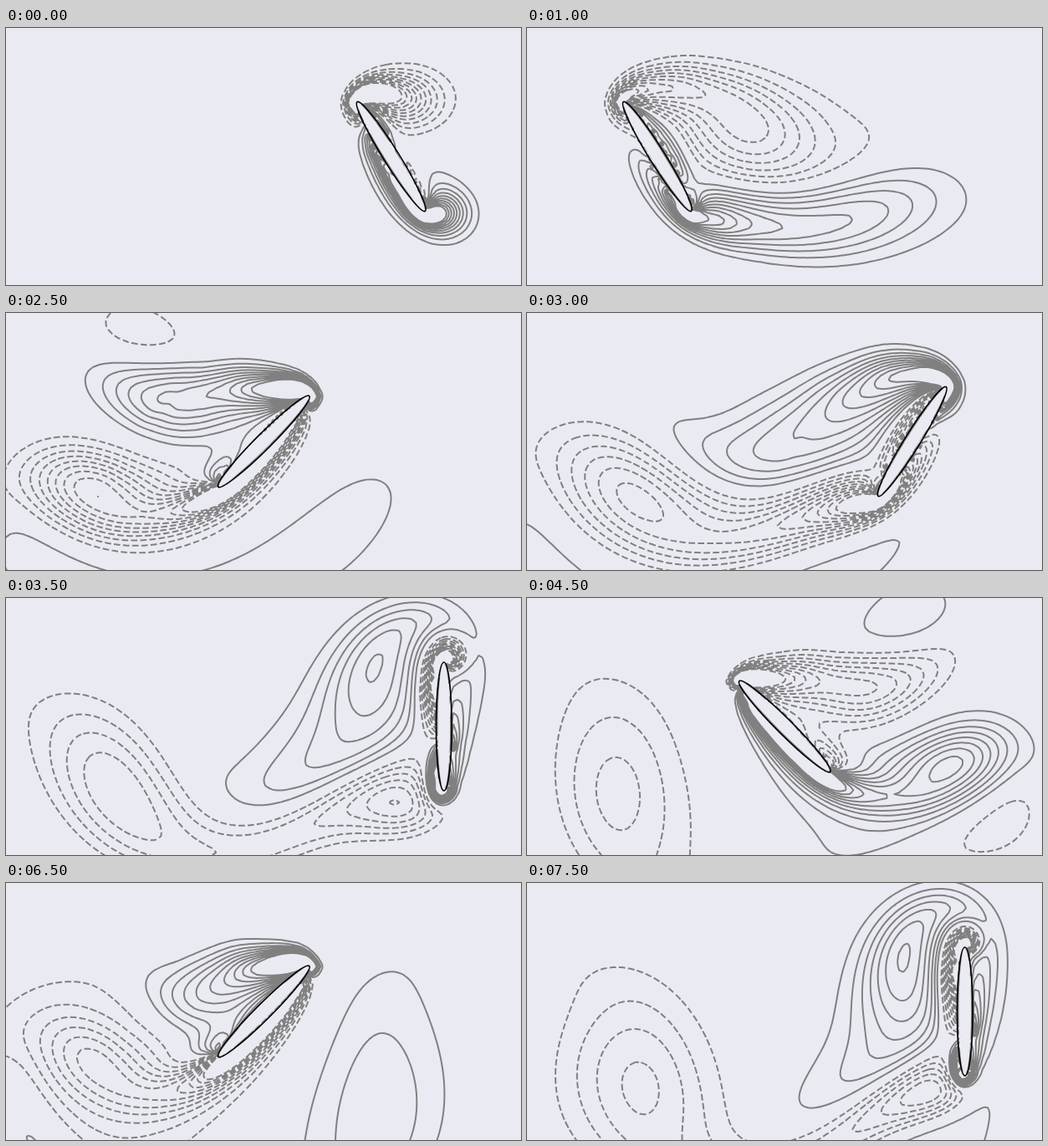
These frames come from a looping animation (616 px wide and 308 px high, 8 s). An HTML page with a canvas:

```html
<!DOCTYPE html>
<html>
<head>
<meta charset="utf-8">
<style>
html, body { margin: 0; width: 100%; height: 100%; overflow: hidden; background: #eaeaf2; }
canvas { display: block; }
</style>
</head>
<body>
<canvas id="stage" width="616" height="308"></canvas>
<script>
// A wing flaps in a viscous fluid that starts at rest; the picture shows its vorticity contours.
const ctx = document.getElementById('stage').getContext('2d');
const PAPER = '#eaeaf2', GREY = '#808080';
const FRAMES = 16, FRAME_MS = 500, TICKS = 48;

const CELL = 5, COLS = 180, ROWS = 130, LEFT = -140, TOP = -150, SIZE = COLS * ROWS;
const MID_X = 308.3, MID_Y = 154, STROKE = 215.5, PITCH = Math.PI / 4;
const HALF_LENGTH = 77, HALF_WIDTH = 9.3, REYNOLDS = 75;
const TURN = Math.PI / 4 / TICKS;
const VISCOSITY = 2 * HALF_LENGTH / REYNOLDS * STROKE * TURN / CELL ** 2;
const LEVELS = 10, FIRST_AREA = 790;

// Velocities sit on the cell faces, in cells per tick; "open" is 0 on faces inside the wing.
const field = () => new Float64Array(SIZE);
let u = field(), v = field(), ticks = 0, level = 0;
const pressure = field(), openU = field(), openV = field();
const frames = [];

const pose = phase => ({ x: MID_X + STROKE * Math.cos(phase), angle: -PITCH * Math.sin(phase) });
const clamp = (n, max) => n < 1 ? 1 : n > max ? max : n;
const cubic = (a, b, c, d, t) => b + t / 2 * (c - a + t * (2 * a - 5 * b + 4 * c - d + t * (3 * (b - c) + d - a)));

function linearAt(f, x, y) {
  x = clamp(x, COLS - 2.01);
  y = clamp(y, ROWS - 2.01);
  const i = x | 0, j = y | 0, s = x - i, t = y - j, c = i + j * COLS;
  return (f[c] * (1 - s) + f[c + 1] * s) * (1 - t) + (f[c + COLS] * (1 - s) + f[c + COLS + 1] * s) * t;
}

function cubicAt(f, x, y) {
  x = clamp(x, COLS - 2.01);
  y = clamp(y, ROWS - 2.01);
  const i = x | 0, j = y | 0, s = x - i, c = i + j * COLS;
  const row = k => cubic(f[k - 1], f[k], f[k + 1], f[k + 2], s);
  return cubic(row(c - COLS), row(c), row(c + COLS), row(c + 2 * COLS), y - j);
}

function each(visit) {
  for (let j = 2; j < ROWS - 2; j++)
    for (let i = 2; i < COLS - 2; i++) visit(i + j * COLS, i, j);
}

// Carries f along the flow; (ox, oy) is where its values sit within a cell.
function advect(f, ox, oy) {
  const out = field();
  each((c, i, j) => {
    const x = i + ox, y = j + oy;
    const mx = x - linearAt(u, x, y - .5) / 2, my = y - linearAt(v, x - .5, y) / 2;
    out[c] = cubicAt(f, i - linearAt(u, mx, my - .5), j - linearAt(v, mx - .5, my));
  });
  return out;
}

function diffuse(f, open) {
  const out = field();
  each(c => {
    out[c] = f[c] + open[c] * VISCOSITY / 2 * (f[c - 1] + f[c + 1] + f[c - COLS] + f[c + COLS] - 4 * f[c]);
  });
  return out;
}

// Gives the faces inside the wing its rigid velocity.
function placeWing(phase) {
  const { x, angle } = pose(phase), cos = Math.cos(angle), sin = Math.sin(angle);
  const speed = -STROKE * Math.sin(phase) * TURN / CELL, spin = -PITCH * Math.cos(phase) * TURN / CELL;
  const inside = (dx, dy) =>
    ((dx * cos + dy * sin) / HALF_WIDTH) ** 2 + ((dy * cos - dx * sin) / HALF_LENGTH) ** 2 < 1;
  each((c, i, j) => {
    const dx = LEFT + i * CELL - x, dy = TOP + j * CELL - MID_Y, half = CELL / 2;
    openU[c] = inside(dx, dy + half) ? 0 : 1;
    openV[c] = inside(dx + half, dy) ? 0 : 1;
    if (!openU[c]) u[c] = speed - spin * (dy + half);
    if (!openV[c]) v[c] = spin * (dx + half);
  });
}

// Makes the flow free of divergence by successive over-relaxation.
function project() {
  const p = pressure, div = field(), sum = field();
  each(c => {
    div[c] = u[c + 1] - u[c] + v[c + COLS] - v[c];
    sum[c] = openU[c] + openU[c + 1] + openV[c] + openV[c + COLS];
    if (!sum[c]) p[c] = 0;
  });
  for (let pass = 0; pass < 30; pass++)
    for (let j = 2; j < ROWS - 2; j++)
      for (let c = j * COLS + 2, end = c + COLS - 4; c < end; c++) {
        if (!sum[c]) continue;
        const around = openU[c] * p[c - 1] + openU[c + 1] * p[c + 1]
          + openV[c] * p[c - COLS] + openV[c + COLS] * p[c + COLS];
        p[c] += 1.9 * ((around - div[c]) / sum[c] - p[c]);
      }
  each(c => {
    u[c] -= openU[c] * (p[c] - p[c - 1]);
    v[c] -= openV[c] * (p[c] - p[c - COLS]);
  });
}

function tick() {
  [u, v] = [advect(u, 0, .5), advect(v, .5, 0)];
  placeWing(++ticks * TURN);
  for (let half = 0; half < 2; half++) [u, v] = [diffuse(u, openU), diffuse(v, openV)];
  project();
  if (ticks % TICKS === 0) frames.push(capture());
}

// Joins the crossings of one level into lines and adds them to the path.
function contour(w, value, path) {
  const links = new Map();
  const link = (a, b) => links.has(a) ? links.get(a).push(b) : links.set(a, [b]);
  const join = (a, b) => { link(a, b); link(b, a); };
  // Edge 2n runs right from node n, edge 2n + 1 runs down from it.
  const far = e => (e >> 1) + (e & 1 ? COLS : 1);
  const crossed = e => w[e >> 1] > value !== w[far(e)] > value;
  const point = e => {
    const n = e >> 1, t = (value - w[n]) / (w[far(e)] - w[n]);
    return [LEFT + CELL * (n % COLS + (e & 1 ? 0 : t)), TOP + CELL * (Math.floor(n / COLS) + (e & 1 ? t : 0))];
  };
  const extend = trail => {
    for (let at = trail[trail.length - 1], next; (next = links.get(at).pop()) !== undefined; at = next) {
      const back = links.get(next);
      back.splice(back.indexOf(at), 1);
      trail.push(next);
    }
  };

  const i0 = Math.floor(-LEFT / CELL) - 2, i1 = Math.ceil((616 - LEFT) / CELL) + 2;
  const j0 = Math.floor(-TOP / CELL) - 2, j1 = Math.ceil((308 - TOP) / CELL) + 2;
  for (let j = j0; j < j1; j++)
    for (let i = i0; i < i1; i++) {
      const n = i + j * COLS;
      const hits = [2 * n, 2 * n + 3, 2 * (n + COLS), 2 * n + 1].filter(crossed);
      for (let k = 0; k < hits.length; k += 2) join(hits[k], hits[k + 1]);
    }

  for (const start of links.keys()) {
    const trail = [start];
    extend(trail);
    trail.reverse();
    extend(trail);
    if (trail.length < 4) continue;
    const points = trail.map(point);
    path.moveTo(...points[0]);
    for (let k = 1; k < points.length - 1; k++) {
      const [x, y] = points[k], [nx, ny] = points[k + 1];
      path.quadraticCurveTo(x, y, (x + nx) / 2, (y + ny) / 2);
    }
    path.lineTo(...points[points.length - 1]);
  }
}

function capture() {
  const w = field(), solid = new Path2D(), dashed = new Path2D();
  each(c => { w[c] = u[c] - u[c - COLS] - v[c] + v[c - 1]; });
  // The spacing of the levels follows from the area that the first vortices fill.
  level = level || w.map(Math.abs).sort()[SIZE - FIRST_AREA];
  for (let k = 1; k <= LEVELS; k++) {
    contour(w, k * level, solid);
    contour(w, -k * level, dashed);
  }
  return { solid, dashed };
}

function drawWing(phase) {
  const { x, angle } = pose(phase);
  const oval = inset => {
    ctx.beginPath();
    ctx.ellipse(x, MID_Y, HALF_WIDTH - inset, HALF_LENGTH - inset, angle, 0, 2 * Math.PI);
  };
  oval(2);
  ctx.fillStyle = PAPER;
  ctx.fill();
  oval(0);
  ctx.setLineDash([]);
  ctx.strokeStyle = '#000';
  ctx.lineWidth = 1.7;
  ctx.stroke();
}

function draw() {
  const now = Math.floor((performance.now() - start) % (FRAMES * FRAME_MS) / FRAME_MS);
  // Besides what is due, work a little ahead.
  for (let k = 0; frames.length <= now || k < 3 && frames.length < FRAMES; k++) tick();
  ctx.fillStyle = PAPER;
  ctx.fillRect(0, 0, 616, 308);
  ctx.strokeStyle = GREY;
  ctx.lineWidth = 2;
  ctx.setLineDash([]);
  ctx.stroke(frames[now].solid);
  ctx.setLineDash([7.7, 3.3]);
  ctx.stroke(frames[now].dashed);
  drawWing((now + 1) * Math.PI / 4);
  requestAnimationFrame(draw);
}

while (!frames.length) tick();
const start = performance.now();
draw();
</script>
</body>
</html>
```
